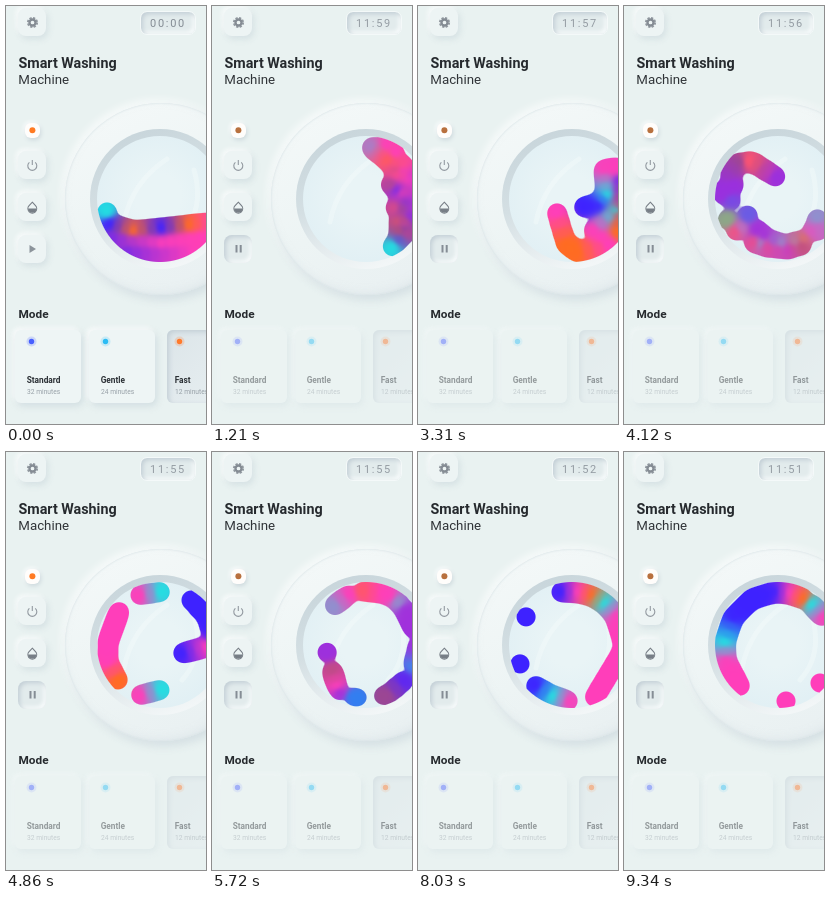
These frames come from a looping animation (200 by 418 pixels, 9.38 s). An HTML page with a canvas:

```html
<!DOCTYPE html>
<html lang="en">
<head>
<meta charset="utf-8">
<title>Smart Washing Machine</title>
<style>
html, body { margin: 0; width: 100%; height: 100%; overflow: hidden; background: #e9f2f1; }
#stage { position: absolute; left: 0; top: 0; width: 200px; height: 418px; overflow: hidden; }
#stage > * { position: absolute; }
svg { left: 0; top: 0; }
text { font-family: Roboto, Arial, sans-serif; }
.btn { left: 12px; width: 28px; height: 28px; border-radius: 8px; background: #edf4f4;
  box-shadow: 2px 3px 6px #cbd8dcaa, -2px -2px 5px #ffffffcc; }
.inset { background: #e2ebec; box-shadow: inset 2px 2px 4px #c3cfd6, inset -2px -2px 4px #fafdfd; }
#clock { left: 134px; top: 5px; width: 56px; height: 24px; border-radius: 7px;
  border: 1px solid #f4f9f9; box-sizing: border-box; }
#lamp { left: 19px; top: 117px; width: 15px; height: 15px; border-radius: 6px; background: #fffdfb;
  box-shadow: 1px 2px 4px #ccd8dc, -1px -1px 4px #fff; }
.card { top: 324px; width: 66px; height: 73px; border-radius: 6px; background: #eef5f5;
  box-shadow: 2px 3px 7px #c9d6dbbb, -2px -2px 5px #ffffffdd; }
.card.inset { background: linear-gradient(135deg, #dce5e9, #e8eff1); box-shadow: inset 2px 2px 5px #c3cfd6; }
#rim { left: 59px; top: 97px; width: 192px; height: 192px; border-radius: 50%;
  background: linear-gradient(155deg, #f5f9f9, #edf4f4 55%, #e8eff1);
  box-shadow: 3px 5px 9px #cbd7dcaa, -3px -3px 8px #ffffffbb, inset 0 0 2px #d3dee2, inset -2px -3px 7px #dae3e688; }
#bezel { left: 84px; top: 123px; width: 140px; height: 140px; border-radius: 50%;
  background: linear-gradient(160deg, #c5d3d9, #d4dfe3 45%, #f2f6f7 88%); }
#glass { left: 91px; top: 130px; width: 126px; height: 126px; border-radius: 50%;
  background: radial-gradient(circle at 48% 48%, #e9f4f6 25%, #e0eff4 80%, #d9e9ef); }
canvas { left: 91px; top: 130px; }
</style>
</head>
<body>
<div id="stage">
  <div class="btn" style="top:2px"></div>
  <div id="clock" class="inset"></div>
  <div id="lamp"></div>
  <div class="btn" style="top:145px"></div>
  <div class="btn" style="top:187px"></div>
  <div class="btn" id="toggle" style="top:229px"></div>
  <div id="rim"></div><div id="bezel"></div><div id="glass"></div>
  <canvas id="drum" width="109" height="126"></canvas>
  <div class="card" style="left:9px"></div>
  <div class="card" style="left:83px"></div>
  <div class="card inset" style="left:161px"></div>
  <svg width="200" height="418" viewBox="0 0 200 418">
    <g fill="none" stroke="#9299a0">
      <circle cx="26.5" cy="16.5" r="4.6" stroke-width="2" stroke-dasharray="2.2 1.41"/>
      <circle cx="26.5" cy="16.5" r="3" stroke="#858c94" stroke-width="2.3"/>
      <path d="M23.4 156.4a4.5 4.5 0 1 0 5.8 0M26.3 154v5" stroke-width="1.1"/>
      <path d="M26.3 196.2l3.2 3.5a4.4 4.4 0 1 1-6.4 0z" stroke="#777e86" stroke-width="1.1"/>
    </g>
    <path d="M22 202.5h8.6a4.3 4.3 0 0 1-8.6 0z" fill="#777e86"/>
    <path id="play" d="M23.5 239v8l6.5-4z" fill="#8c949b"/>
    <path id="pause" d="M23.5 239h2v7.5h-2zM27.7 239h2v7.5h-2z" fill="#858d95"/>
    <circle id="led" cx="26.4" cy="124.3" r="3"/>
    <text id="time" x="144" y="20.5" font-size="11" letter-spacing="1.7"></text>
    <text x="12.5" y="62" font-size="14.3" font-weight="700" fill="#262a2e">Smart Washing</text>
    <text x="12.3" y="78" font-size="13.3" fill="#303438">Machine</text>
    <text x="12.5" y="312" font-size="11.8" font-weight="700" fill="#262a2e">Mode</text>
    <g id="labels"></g>
  </svg>
</div>
<script>
const LOOP = 9380, START = 250, N = 40, TAU = Math.PI * 2;
const CX = 154, CY = 193, GLASS = 63, X0 = 91, Y0 = 130, W = 109, H = 126;
const $ = id => document.getElementById(id);
const mix = (a, b, p) => a + (b - a) * p;
const clamp = v => Math.max(0, Math.min(1, v));
const INK = { c: [34, 224, 226], p: [255, 62, 186], o: [255, 108, 32], b: [62, 34, 255], u: [128, 44, 228] };

// Liquid poses: strands of x,y,ink separated by bars
const POSES = [
  [0, '101,206,c|104,218,b 127,225,o 155,222,b 183,219,o 207,217,p|107,232,u 155,237,p 203,230,p|122,246,u 187,247,p'],
  [2210, '166,152,c 180,149,p 195,158,p|186,172,o 172,205,p 174,227,o 169,245,c|203,170,p 189,203,u 183,238,b|208,185,p 203,220,u'],
  [3310, '139,207,p 148,237,o 160,246,o 190,238,p 176,224,p 198,204,c|166,201,b 180,199,b 189,188,c 186,164,p 200,162,p|201,175,u 200,225,o'],
  [4860, '112,228,o 102,210,p 102,190,p 113,160,p|134,143,p 154,140,c|135,243,p 154,238,c|185,148,b 200,164,b 207,184,b|177,201,b 200,195,p'],
  [6620, '115,157,c|140,141,p 162,139,o|200,162,p|101,203,o 112,219,u 121,231,b 155,247,b 167,246,c 180,243,p 207,212,p'],
  [8030, '108,165,b|102,212,b|118,234,b 135,244,c 150,249,p|143,140,b 159,140,p 173,143,o 186,151,c 197,163,p 207,195,p 177,245,p'],
  [9340, '116,234,p 102,208,p 101,190,c 109,166,b 128,147,b 151,140,b 165,141,p 178,146,o 188,153,c 198,164,p|162,249,p|196,231,p']
];

function strand(text) {
  const pts = text.split(' ').map(s => s.split(','));
  const out = [];
  const add = (x, y, ink) => {
    x -= CX; y -= CY;
    out.push({ a: (Math.atan2(y, x) + TAU) % TAU, r: Math.hypot(x, y), ink });
  };
  for (let i = 0; i + 1 < pts.length; i++) {
    const [x, y, c] = pts[i], [u, v, d] = pts[i + 1];
    const n = Math.max(1, Math.round(Math.hypot(u - x, v - y) / 9));
    for (let j = 0; j < n; j++) {
      const p = j / n;
      add(mix(+x, +u, p), mix(+y, +v, p), INK[c].map((k, m) => mix(k, INK[d][m], p)));
    }
  }
  const [x, y, c] = pts[pts.length - 1];
  add(+x, +y, INK[c]);
  return out;
}

// Blobs ordered by angle, beginning after the widest gap, spread over N slots
function buildPose([time, text]) {
  const raw = text.split('|').flatMap(strand).sort((a, b) => a.a - b.a);
  const m = raw.length;
  let first = 0, widest = -1;
  raw.forEach((b, i) => {
    const gap = (b.a - raw[(i + m - 1) % m].a + TAU) % TAU;
    if (gap > widest) { widest = gap; first = i; }
  });
  const ordered = raw.map((_, i) => {
    const b = raw[(first + i) % m];
    return { ...b, a: b.a + (first + i >= m ? TAU : 0) };
  });
  const slots = Array.from({ length: N }, (_, i) => Math.floor(i * m / N));
  const blobs = slots.map(s => ({ ...ordered[s], w: 1 / slots.filter(k => k === s).length }));
  return { time, blobs, mean: blobs.reduce((s, b) => s + b.a, 0) / N };
}

const poses = POSES.map(buildPose);
for (let i = 1; i < poses.length; i++) {
  const prev = poses[i - 1], cur = poses[i];
  const goal = prev.mean + (cur.time - prev.time) / 1500 * TAU;
  const shift = Math.round((goal - cur.mean) / TAU) * TAU;
  cur.mean += shift;
  cur.blobs.forEach(b => b.a += shift);
}

function blobsAt(t) {
  let i = 0;
  while (i < poses.length - 2 && t >= poses[i + 1].time) i++;
  const A = poses[i], B = poses[i + 1];
  let p = clamp((t - A.time) / (B.time - A.time));
  if (i === 0) p = p ** 1.5;
  return A.blobs.map((a, k) => {
    const b = B.blobs[k], ang = mix(a.a, b.a, p), r = mix(a.r, b.r, p);
    return {
      x: CX + Math.cos(ang) * r, y: CY + Math.sin(ang) * r,
      w: mix(a.w, b.w, p), ink: a.ink.map((v, m) => mix(v, b.ink[m], p))
    };
  });
}

const ctx = $('drum').getContext('2d');
const image = ctx.createImageData(W, H);

function reflections() {
  ctx.lineCap = 'round';
  [[118, 216, 126, 176, 161, 153], [176, 228, 199, 203, 188, 164]].forEach(q => {
    ctx.strokeStyle = '#f4fafb70';
    ctx.lineWidth = 5;
    ctx.beginPath();
    ctx.moveTo(q[0] - X0, q[1] - Y0);
    ctx.quadraticCurveTo(q[2] - X0, q[3] - Y0, q[4] - X0, q[5] - Y0);
    ctx.stroke();
  });
}

function drawLiquid(t) {
  const blobs = blobsAt(t), px = image.data, K = 0.4, SIZE = 9.5;
  for (let j = 0, o = 0; j < H; j++) {
    for (let i = 0; i < W; i++, o += 4) {
      const x = X0 + i + 0.5, y = Y0 + j + 0.5;
      const edge = GLASS + 0.5 - Math.hypot(x - CX, y - CY);
      let sum = 0, cw = 0, r = 0, g = 0, b = 0;
      px[o + 3] = 0;
      if (edge <= 0) continue;
      for (const s of blobs) {
        const dx = x - s.x, dy = y - s.y, d2 = dx * dx + dy * dy;
        if (d2 > 900) continue;
        sum += s.w * Math.exp(K * (SIZE - Math.sqrt(d2)));
        const w = s.w / ((d2 + 30) * (d2 + 30));
        cw += w;
        r += w * s.ink[0]; g += w * s.ink[1]; b += w * s.ink[2];
      }
      if (sum < 0.7) continue;
      px[o] = r / cw; px[o + 1] = g / cw; px[o + 2] = b / cw;
      px[o + 3] = 255 * clamp(Math.min(edge, Math.log(sum) / K + 0.5));
    }
  }
  ctx.putImageData(image, 0, 0);
  ctx.globalCompositeOperation = 'destination-over';
  reflections();
  ctx.globalCompositeOperation = 'source-over';
}

const modes = [['Standard', 32, 21, '#4860ff'], ['Gentle', 24, 95, '#2cbcf4'], ['Fast', 12, 169, '#ff7a2c']];
$('labels').innerHTML = modes.map(([name, min, x, ink]) => `
  <circle cx="${x + 4.5}" cy="335.5" r="5" fill="${ink}" opacity=".2"/>
  <circle cx="${x + 4.5}" cy="335.5" r="2.7" fill="${ink}"/>
  <text x="${x - 0.3}" y="377" font-size="8.3" font-weight="700" fill="#2b3035">${name}</text>
  <text x="${x}" y="388" font-size="6.7" fill="#98a1a8">${min} minutes</text>`).join('');
const cards = document.querySelectorAll('.card');

function clockText(t) {
  if (t < START) return '00:00';
  const left = 720 - Math.floor((t + 200) / 1000);
  return [Math.floor(left / 60), left % 60].map(v => String(v).padStart(2, '0')).join(':');
}

function draw(t) {
  const on = t >= START, fade = clamp((t - START) / 300);
  $('time').textContent = clockText(t);
  $('time').setAttribute('fill', on ? '#949ca3' : '#838b93');
  $('toggle').classList.toggle('inset', on);
  $('play').style.display = on ? 'none' : '';
  $('pause').style.display = on ? '' : 'none';
  const dim = on ? clamp(((t + 200) % 1000 - 100) / 100) : 0;
  $('led').setAttribute('fill', `rgb(${mix(255, 184, dim)},${mix(122, 112, dim)},${mix(34, 62, dim)})`);
  $('labels').style.opacity = mix(1, 0.45, fade);
  cards.forEach(c => c.style.opacity = mix(1, 0.45, fade));
  drawLiquid(t);
}

const begin = performance.now();
function tick() {
  draw((performance.now() - begin) % LOOP);
  requestAnimationFrame(tick);
}
tick();
</script>
</body>
</html>
```
